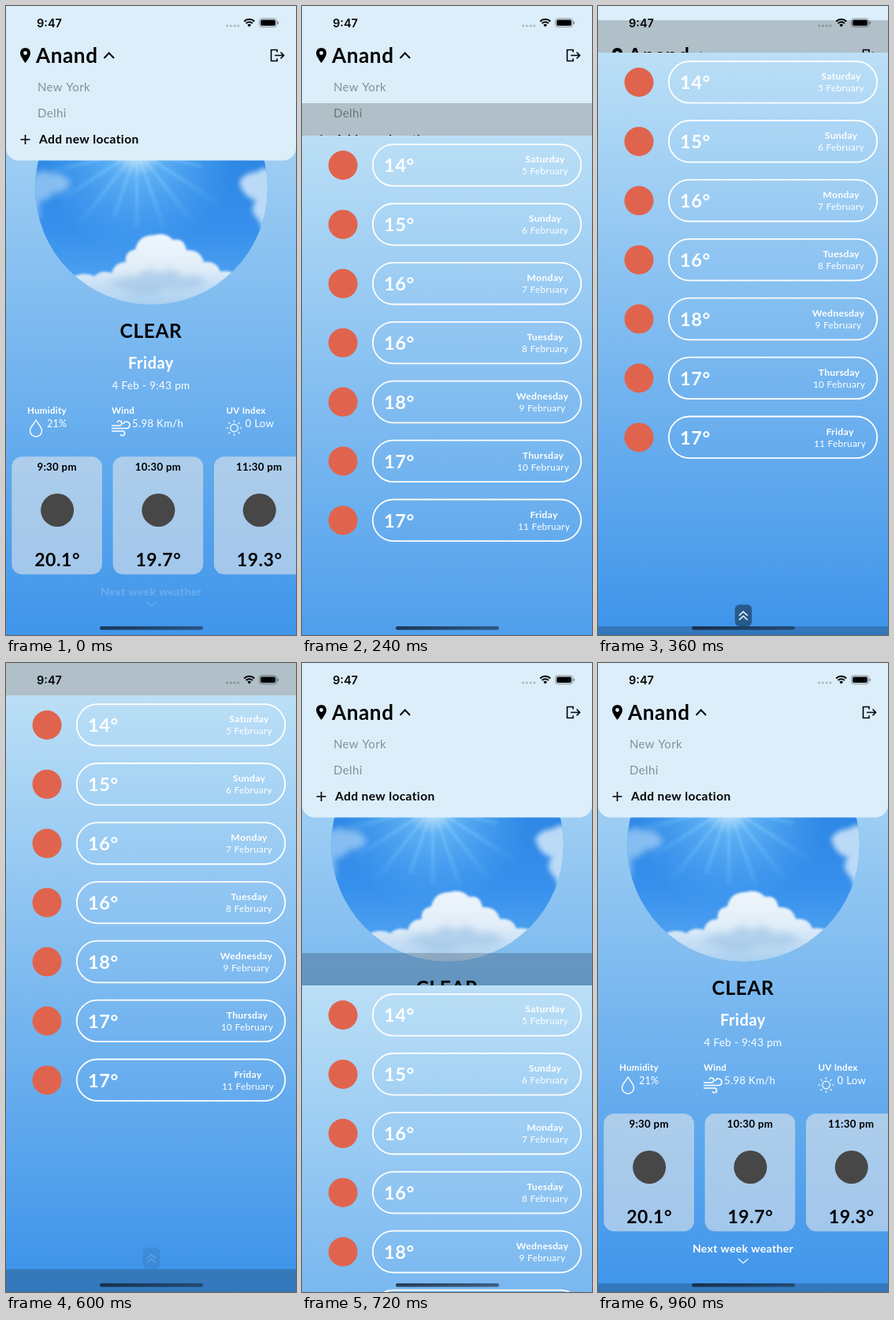
An HTML page with a canvas that plays this animation: 368x796 px, repeating every 1080 ms.

```html
<!DOCTYPE html>
<html lang="en">
<head>
<meta charset="utf-8">
<title>Weather</title>
<style>
html, body { margin: 0; width: 368px; height: 796px; overflow: hidden; }
canvas { display: block; }
</style>
</head>
<body>
<canvas id="stage" width="368" height="796"></canvas>
<script>
const W = 368, H = 796, LOOP = 1080, STEP = 120;
const ctx = document.getElementById('stage').getContext('2d');
const TAU = Math.PI * 2;

function text(str, x, y, size, weight = 700, color = '#fff', align = 'left', family = 'Lato') {
  ctx.font = `${weight} ${size}px ${family}, sans-serif`;
  ctx.letterSpacing = family === 'Lato' ? `${size * 0.025}px` : '0px';
  ctx.textAlign = align;
  ctx.fillStyle = color;
  ctx.fillText(str, x, y);
}

function disc(x, y, r, fill) {
  ctx.fillStyle = fill;
  ctx.beginPath();
  ctx.arc(x, y, r, 0, TAU);
  ctx.fill();
}

function box(x, y, w, h, r, fill) {
  ctx.fillStyle = fill;
  ctx.beginPath();
  ctx.roundRect(x, y, w, h, r);
  ctx.fill();
}

function stroke(d, color = '#fff', width = 1.3) {
  ctx.strokeStyle = color;
  ctx.lineWidth = width;
  ctx.stroke(new Path2D(d));
}

function gradient(x0, y0, x1, y1, ...colors) {
  const g = ctx.createLinearGradient(x0, y0, x1, y1);
  colors.forEach((c, i) => g.addColorStop(i / (colors.length - 1), c));
  return g;
}

const pageSky = (top, bottom) => gradient(0, top, 0, bottom, '#bbdff6', '#3f95ea');

function softShape(d, fill, blur) {
  ctx.filter = `blur(${blur}px)`;
  ctx.fillStyle = fill;
  ctx.fill(new Path2D(d));
  ctx.filter = 'none';
}

function sunRays(x, y) {
  const glow = ctx.createRadialGradient(x, y, 4, x, y, 130);
  glow.addColorStop(0, 'rgba(225,246,255,.95)');
  glow.addColorStop(0.25, 'rgba(125,202,252,.6)');
  glow.addColorStop(1, 'rgba(85,172,247,0)');
  ctx.fillStyle = glow;
  ctx.fillRect(37, 83, 295, 295);
  let rays = '';
  for (let i = 0; i < 9; i++) {
    const a = 0.25 + i * 0.33, r = 85 + (i * 37) % 45;
    const point = da => `${x + r * Math.cos(a + da)} ${y + r * Math.sin(a + da)}`;
    rays += `M${x} ${y}L${point(-0.04)}L${point(0.04)}Z`;
  }
  softShape(rays, glow, 1.5);
}

function skyPicture() {
  ctx.save();
  ctx.beginPath();
  ctx.arc(184.5, 230.5, 147.5, 0, TAU);
  ctx.clip();
  ctx.fillStyle = gradient(0, 190, 0, 378, '#2c86e4', '#3790ec', '#58a9f2');
  ctx.fillRect(37, 83, 295, 295);
  sunRays(166, 182);

  softShape('M80 345Q98 335 112 342Q122 333 134 338Q138 324 152 324Q150 311 164 308Q168 290 187 290Q202 285 212 296Q226 293 229 309Q247 308 251 324Q267 322 272 336Q288 333 300 345L300 390H80Z',
    gradient(0, 288, 0, 378, '#eff6fc', '#e0edf8', '#a9cff0'), 1.5);
  softShape('M128 352Q150 340 166 343Q180 326 194 338Q214 326 224 344Q244 336 256 352Q226 362 204 357Q176 374 156 360Z',
    'rgba(145,187,226,.5)', 5);
  softShape('M296 222Q304 210 318 210Q332 200 340 210V290Q324 288 322 272Q306 258 318 246Q300 242 296 222Z',
    'rgba(222,238,251,.8)', 3);
  softShape('M30 215Q48 205 58 212Q76 210 82 226Q74 238 60 236Q54 248 42 246V270H30Z',
    'rgba(180,217,248,.65)', 4);
  ctx.restore();
}

function locationMenu() {
  box(0, -20, W, 215.5, 16, '#dceefa');
  ctx.fillStyle = '#000';
  ctx.fill(new Path2D('M24.5 53C20.8 53 18 55.8 18 59.5C18 64.3 24.5 72 24.5 72C24.5 72 31 64.3 31 59.5C31 55.8 28.2 53 24.5 53Z'));
  disc(24.5, 59.5, 2.4, '#dceefa');
  text('Anand', 38, 71.5, 26, 700, '#000');
  stroke('M124.5 66L130.7 59.5L137 66', '#000', 2);
  stroke('M344 58.5V55.5H336.5V69.5H344V66.5M341 62.5H352.5M348.5 58.5L352.5 62.5L348.5 66.5', '#000', 1.6);
  text('New York', 40, 108, 15, 400, '#84919a');
  text('Delhi', 40, 141, 15, 400, '#84919a');
  stroke('M18.5 169H30.5M24.5 163V175', '#000', 1.6);
  text('Add new location', 42, 174, 15.5, 700, '#000');
}

function conditions() {
  text('CLEAR', 184, 420, 24.5, 700, '#000', 'center');
  text('Friday', 184, 459, 20, 700, '#fff', 'center');
  text('4 Feb - 9:43 pm', 184, 484.5, 13.5, 400, '#fff', 'center');
  text('Humidity', 27, 516, 11.5);
  text('Wind', 134, 516, 11.5);
  text('UV Index', 279.5, 516, 11.5);
  text('21%', 52, 533, 12.5, 400);
  text('5.98 Km/h', 160, 533, 13.2, 400);
  text('0 Low', 303.5, 533, 13.2, 400);

  stroke('M38 524C36 528 30.5 533 30.5 537.5A7.3 7.3 0 0 0 45.5 537.5C45.5 533 40 528 38 524Z');
  stroke('M134 531H144A3 3 0 1 0 141 527M134 534.5H153A4.2 4.2 0 1 0 148.8 529M134 538H148A2.9 2.9 0 1 1 145 542', '#fff', 1.6);
  ctx.beginPath();
  ctx.arc(289.5, 534, 4.8, 0, TAU);
  for (let i = 0; i < 8; i++) {
    const c = Math.cos(i * TAU / 8), s = Math.sin(i * TAU / 8);
    ctx.moveTo(289.5 + 7.3 * c, 534 + 7.3 * s);
    ctx.lineTo(289.5 + 10 * c, 534 + 10 * s);
  }
  ctx.lineWidth = 1.2;
  ctx.stroke();
}

function hourCards() {
  [['9:30 pm', '20.1°'], ['10:30 pm', '19.7°'], ['11:30 pm', '19.3°']].forEach(([hour, temp], i) => {
    const x = 7.3 + i * 128.3, mid = x + 57.3;
    box(x, 570.3, 114.6, 149, 13, 'rgba(235,236,236,.55)');
    text(hour, mid, 587.5, 13.2, 700, '#000', 'center');
    disc(mid + 0.5, 638, 21, '#474747');
    text(temp, mid + 0.5, 709, 23, 700, '#000', 'center');
  });
}

function home(linkAlpha) {
  ctx.fillStyle = pageSky(0, H);
  ctx.fillRect(0, 0, W, H);
  skyPicture();
  locationMenu();
  conditions();
  hourCards();
  ctx.globalAlpha = linkAlpha;
  text('Next week weather', 184, 746, 14, 700, '#fff', 'center');
  stroke('M178 754L184.3 759.5L190.5 754', '#fff', 1.1);
  ctx.globalAlpha = 1;
}

const week = [
  [14, 'Saturday', 308.5], [15, 'Sunday', 308.5], [16, 'Monday', 308.5], [16, 'Tuesday', 308.5],
  [18, 'Wednesday', 305], [17, 'Thursday', 306], [17, 'Friday', 307]
];

function weekSheet(top, buttonAlpha) {
  ctx.save();
  ctx.translate(0, top);
  ctx.fillStyle = 'rgba(0,0,0,.2)';
  ctx.fillRect(0, 0, W, 41);
  ctx.fillRect(0, 767, W, 29);
  ctx.fillStyle = pageSky(41, 767);
  ctx.fillRect(0, 41, W, 726);
  week.forEach(([temp, day, mid], i) => {
    const y = 78.3 + i * 74.9;
    disc(52, y + 0.2, 18.5, '#e0644d');
    ctx.beginPath();
    ctx.roundRect(89.8, y - 26.2, 264.4, 52.6, 26.3);
    ctx.strokeStyle = '#fff';
    ctx.lineWidth = 1.8;
    ctx.stroke();
    text(temp + '°', 104, y + 9, 23.5);
    text(day, mid, y - 3, 12.2, 700, '#fff', 'center');
    text(`${5 + i} February`, mid, y + 12, 11.8, 400, '#fff', 'center');
  });
  ctx.globalAlpha = buttonAlpha;
  box(173.7, 739.5, 21.5, 27.5, 6, 'rgba(0,0,0,.4)');
  stroke('M179 753.5L184.4 748.5L189.8 753.5M179 759L184.4 754L189.8 759', '#fff', 1.5);
  ctx.restore();
}

function statusBar() {
  text('9:47', 39, 26.5, 14.5, 600, '#000', 'left', 'Inter');
  for (let i = 0; i < 4; i++) disc(280.7 + i * 4.7, 25, 1.6, 'rgba(0,0,0,.22)');
  ctx.strokeStyle = '#000';
  ctx.lineWidth = 2.1;
  for (const r of [9.2, 5.8]) {
    ctx.beginPath();
    ctx.arc(308.7, 26, r, -Math.PI * 0.75, -Math.PI * 0.25);
    ctx.stroke();
  }
  ctx.fillStyle = '#000';
  ctx.fill(new Path2D('M308.7 26.5L306.3 24A3.5 3.5 0 0 1 311.1 24Z'));
  ctx.beginPath();
  ctx.roundRect(321.5, 16, 22, 10.6, 3.3);
  ctx.strokeStyle = 'rgba(0,0,0,.4)';
  ctx.lineWidth = 1;
  ctx.stroke();
  box(323, 17.5, 19, 7.6, 2, '#000');
  box(344.5, 19.6, 1.4, 3.6, 0.7, 'rgba(0,0,0,.45)');
  box(119, 785, 131, 4.4, 2.2, gradient(119, 0, 250, 0, 'rgba(15,30,48,.8)', 'rgba(25,50,78,.65)'));
}

// Critically damped spring: the share of travel left after ms.
function remaining(ms) {
  const x = Math.max(0, ms) * 0.0197;
  return (1 + x) * Math.exp(-x);
}

const OPEN_AT = 71, CLOSE_AT = 641;

function draw(now) {
  const t = Math.floor((now % LOOP) / STEP) * STEP;
  const left = t < CLOSE_AT ? remaining(t - OPEN_AT) : 1 - remaining(t - CLOSE_AT);
  home(t < STEP ? 0.2 : 1);
  if (left < 1) weekSheet(Math.round(H * left), t >= 600 ? 0.2 : 1);
  statusBar();
}

const start = performance.now();
function tick() {
  draw(performance.now() - start);
  requestAnimationFrame(tick);
}
tick();
</script>
</body>
</html>
```
